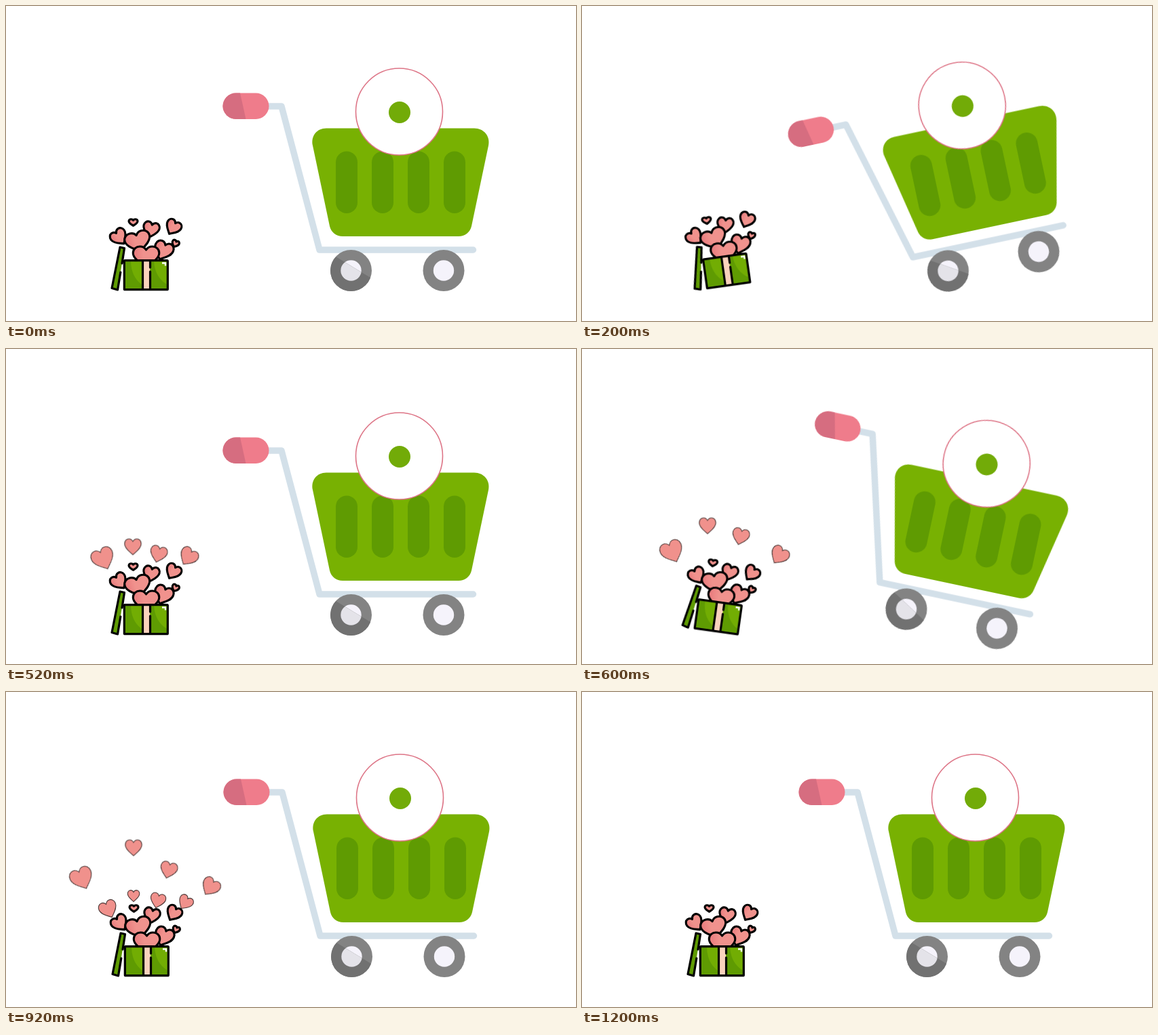
An HTML page for the animation above (1400 ms loop, 840 px wide and 465 px high).

```html
<!DOCTYPE html>
<html lang="en">
<head>
<meta charset="utf-8">
<title>Cart and gift</title>
<style>
  html, body { margin: 0; width: 100%; height: 100%; overflow: hidden; background: #fff; }
  svg { display: block; width: 840px; height: 465px; }

  .cart, .gift, .fly { animation: 1400ms step-end infinite; }
  .cart { animation-name: cart; transform-origin: 508.5px 390.5px; }
  .gift { animation-name: gift; transform-origin: 206px 420px; }
  .fly { animation-name: fly; }
  .late { animation-name: late; }

  @keyframes cart {
    0%, 85.714%, 100% { transform: none; }
    14.285% { transform: translate(31px, .5px) rotate(-12deg); }
    28.571%, 71.428% { transform: translate(0, 2px); }
    42.857% { transform: translate(-30.5px, -6.5px) rotate(12deg); }
    57.142% { transform: translate(1px, 0); }
  }
  @keyframes gift {
    0%, 85.714%, 100% { transform: none; }
    14.285% { transform: translate(10px, -6.3px) rotate(-8deg); }
    28.571%, 71.428% { transform: translate(0, 2px); }
    42.857% { transform: translate(-8.8px, -2px) rotate(8deg); }
    57.142% { transform: translate(1px, 0); }
  }
  /* --a, --b, --c: the three stops of each flight */
  @keyframes fly {
    0%, 85.714%, 100% { opacity: 0; transform: translate(var(--a)); }
    28.571%, 71.428% { opacity: 1; transform: translate(var(--a)); }
    42.857% { opacity: 1; transform: translate(var(--b)); }
    57.142% { opacity: 1; transform: translate(var(--c)); }
  }
  @keyframes late {
    0%, 71.428%, 100% { opacity: 0; }
    57.142% { opacity: 1; }
  }

  .heart { vector-effect: non-scaling-stroke; }
  .air { fill: #f0918c; stroke: #4d3a38; stroke-width: 1.1; }
  .pile { fill: url(#blush); stroke: #000; stroke-width: 3.1; stroke-linejoin: round; }
  .line { fill: none; stroke: #000; stroke-width: 3.2; stroke-linecap: round; stroke-linejoin: round; }
</style>
</head>
<body>
<svg viewBox="0 0 840 465">
  <defs>
    <path id="heart" class="heart" d="M0 12C-4 8-12.5 3-12.5-4.500C-12.5-9-9.500-12-6-12C-3-12-1-10 0-8C1-10 3-12 6-12C9.500-12 12.500-9 12.500-4.500C12.500 3 4 8 0 12Z"/>
    <rect id="slot" x="-16" y="214.500" width="32" height="91.500" rx="16"/>
    <linearGradient id="blush">
      <stop offset=".1" stop-color="#ea7f80"/>
      <stop offset=".4" stop-color="#f0928d"/>
    </linearGradient>
    <clipPath id="half"><path d="M486 370L537 401A30.500 30.500 0 1 1 486 370Z"/></clipPath>
  </defs>

  <g class="cart">
    <path d="M386 148H406L462 360H688.500" fill="none" stroke="#d3e0e9" stroke-width="9.500" stroke-linejoin="round" stroke-linecap="round"/>
    <rect x="319.500" y="128.500" width="68" height="38.500" rx="19.250" fill="#ef7c8b"/>
    <path d="M345 128.500H338.750a19.250 19.250 0 0 0 0 38.500H353.500Z" fill="#d66d80"/>

    <path d="M472 180.500H690C704 180.500 714 192 711 206L686 325C684 334 676 340 667 340H496C487 340 479 334 477 325L452 206C449 192 458 180.500 472 180.500Z" fill="#78b102"/>
    <g fill="#5f9b02">
      <use href="#slot" x="502"/>
      <use href="#slot" x="555"/>
      <use href="#slot" x="608"/>
      <use href="#slot" x="661"/>
    </g>

    <g fill="#838383">
      <circle cx="508.500" cy="390.500" r="30.500"/>
      <circle cx="645" cy="390.500" r="30.500"/>
    </g>
    <g fill="#f5f3fb">
      <circle cx="508.500" cy="390.500" r="15.200"/>
      <circle cx="645" cy="390.500" r="15.200"/>
    </g>
    <g clip-path="url(#half)">
      <circle cx="508.500" cy="390.500" r="30.500" fill="#717171"/>
      <circle cx="508.500" cy="390.500" r="15.200" fill="#e4e3e9"/>
    </g>

    <circle cx="579.500" cy="156" r="64" fill="#fff" stroke="#dd7486" stroke-width="1.600"/>
    <circle cx="580" cy="157" r="16" fill="#72ab08"/>
  </g>

  <g class="air">
    <g class="fly" style="--a:143.500px,310px; --b:133px,299.500px; --c:112px,275.500px"><use href="#heart" transform="rotate(-24) scale(1.320)"/></g>
    <g class="fly" style="--a:187px,292px; --b:185px,261px; --c:188px,230px"><use href="#heart" transform="scale(.980)"/></g>
    <g class="fly" style="--a:224.500px,303px; --b:233.500px,277px; --c:239.500px,263px"><use href="#heart" transform="rotate(15)"/></g>
    <g class="fly" style="--a:268.500px,307px; --b:290.500px,305px; --c:301px,288px"><use href="#heart" transform="rotate(34) scale(1.080)"/></g>
    <g class="fly late">
      <use href="#heart" transform="translate(151 321) rotate(-24) scale(1.050)"/>
      <use href="#heart" transform="translate(188 301) scale(.700)"/>
      <use href="#heart" transform="translate(223.500 308) rotate(15) scale(.900)"/>
      <use href="#heart" transform="translate(264 311) rotate(34) scale(.860)"/>
    </g>
  </g>

  <g class="gift">
    <path d="M168.500 356L174.500 357.500L164.500 419L156 416.500Z" fill="#5f9b02"/>
    <path class="line" d="M168.800 393L164.500 419L156 416.500L168 356L174.500 357.500L171 380"/>
    <g class="pile">
      <use href="#heart" transform="translate(167 341.500) rotate(-36) scale(.960)"/>
      <use href="#heart" transform="translate(213.500 330.500) rotate(14) scale(.950)"/>
      <use href="#heart" transform="translate(231.500 361.500) rotate(22) scale(1.120)"/>
      <use href="#heart" transform="translate(194.500 348) rotate(-14) scale(1.500 1.220)"/>
      <use href="#heart" transform="translate(206.500 370) scale(1.540 1.250)"/>
      <use href="#heart" transform="translate(246 327) rotate(30) scale(.900)"/>
      <use href="#heart" transform="translate(187.500 319.500) scale(.520 .400)"/>
      <use href="#heart" transform="translate(249.500 351) rotate(25) scale(.420)"/>
    </g>
    <rect x="174.300" y="375.700" width="64" height="43" fill="#72ad03"/>
    <path d="M175 376H184Q184 400 201 412V419H175Z" fill="#5f9b02"/>
    <path d="M213 376H218Q219 400 237 411V419H213Z" fill="#5f9b02"/>
    <path d="M202 376H212V419H202Z" fill="#fad3bd"/>
    <rect class="line" x="174.300" y="375.700" width="64" height="43" rx="1"/>
    <path class="line" d="M201.500 377V417M212.500 377V386M212.500 392V417"/>
    <path d="M230 379.500H235V383.500" fill="none" stroke="#fff" stroke-width="2.400"/>
  </g>
</svg>
</body>
</html>
```
